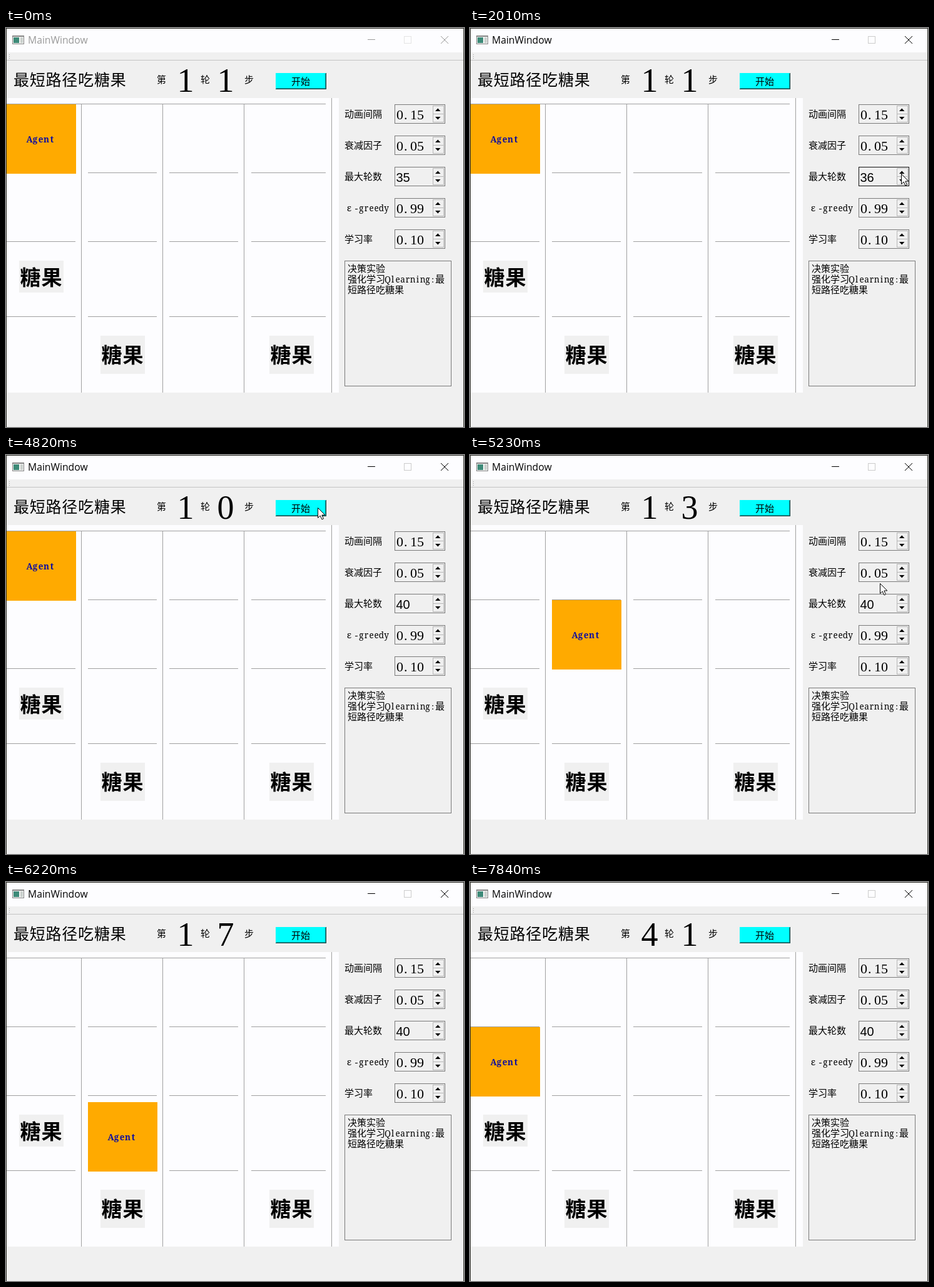
An HTML page with a canvas that plays this animation: 732 by 638 pixels, repeating every 8 s.

```html
<!DOCTYPE html>
<html lang="zh-CN">
<head>
<meta charset="utf-8">
<style>
html, body { margin: 0; width: 732px; height: 638px; overflow: hidden; }
canvas { display: block; }
</style>
</head>
<body>
<canvas id="stage" width="732" height="638"></canvas>
<script>
const ctx = document.getElementById('stage').getContext('2d');
const LOOP = 8000;
const PANEL = '#f0f0f0', WHITE = '#fdfdff', EDGE = '#7a7a7a', GRID = '#a0a0a0';
const CJK = '"Noto Sans CJK SC", "Noto Sans CJK", sans-serif';
const DIGITS = '"Liberation Serif", serif', LETTERS = '"Noto Serif", serif';

// time, round, step, column, row
const agentKeys = [
  [0, 1, 1, 0, 0], [4820, 1, 0, 0, 0], [5020, 1, 1, 1, 0], [5230, 1, 3, 1, 1],
  [5430, 1, 4, 2, 1], [5630, 1, 5, 2, 1], [5830, 1, 6, 2, 2], [6030, 1, 7, 1, 2],
  [6230, 1, 8, 1, 1], [6430, 1, 9, 0, 1], [6630, 2, 0, 0, 0], [6830, 2, 1, 0, 0],
  [7260, 2, 2, 0, 1], [7450, 3, 0, 0, 0], [7650, 3, 1, 0, 1], [7840, 4, 1, 0, 1]
];
// time, pointer shape, x, y
const pointerKeys = [
  [0, ''], [610, 'arrow', 700, 330], [810, 'arrow', 686, 272], [1010, 'beam', 675, 249],
  [1210, 'arrow', 689, 232], [1410, 'arrow', 689, 233], [3230, 'beam', 663, 246],
  [3430, 'arrow', 612, 192], [3630, 'arrow', 552, 132], [3830, 'arrow', 512, 96],
  [4020, 'arrow', 497, 87], [4220, 'arrow', 498, 84], [5020, 'arrow', 560, 130],
  [5230, 'arrow', 655, 205], [5430, 'arrow', 696, 240], [5630, '']
];
const at = (keys, t) => keys.findLast(k => k[0] <= t);

function rect(x, y, w, h, color) {
  ctx.fillStyle = color;
  ctx.fillRect(x, y, w, h);
}
function frame(x, y, w, h, color) {
  ctx.strokeStyle = color;
  ctx.lineWidth = 1;
  ctx.strokeRect(x + .5, y + .5, w - 1, h - 1);
}
function shape(points, fill, stroke) {
  ctx.beginPath();
  points.forEach(([x, y]) => ctx.lineTo(x, y));
  ctx.closePath();
  ctx.fillStyle = fill;
  ctx.fill();
  if (stroke) {
    ctx.strokeStyle = stroke;
    ctx.lineWidth = 1;
    ctx.stroke();
  }
}
function write(text, x, y, font, color = '#000') {
  ctx.font = font;
  ctx.fillStyle = color;
  ctx.fillText(text, x, y);
}

// Full-width and half-width characters on a fixed pitch, centred on line cy.
function cells(text, x, cy, size, { weight = 400, color = '#000', half = size / 2, full = size } = {}) {
  ctx.textAlign = 'center';
  for (const ch of String(text)) {
    const cjk = ch > '\u2000', letter = /[a-zε]/i.test(ch);
    const pitch = cjk || ch === 'ε' ? full : half;
    const family = cjk ? CJK : letter ? LETTERS : DIGITS;
    const px = letter && ch !== 'ε' ? size * .9 : size;
    const cx = x + (ch === '.' ? pitch * .35 : pitch / 2);
    write(ch, cx, cy + size * (cjk ? .38 : .35), `${weight} ${px}px ${family}`, color);
    x += pitch;
  }
  ctx.textAlign = 'left';
}

function titleBar(active) {
  const ink = active ? '#000' : '#999';
  rect(1, 1, 730, 38, WHITE);
  rect(10, 12, 19, 14, '#858585');
  rect(11, 14, 17, 11, '#f4f4f4');
  rect(12, 15, 9, 9, '#3d8a78');
  rect(23, 15, 4, 9, '#c9d0cc');
  write('MainWindow', 35, 25, '15.7px "Open Sans", sans-serif', ink);
  rect(578, 18, 12, 1, ink);
  frame(636, 13, 12, 12, active ? '#ccc' : '#e4e4e4');
  ctx.strokeStyle = ink;
  ctx.beginPath();
  ctx.moveTo(695, 13); ctx.lineTo(707, 25);
  ctx.moveTo(707, 13); ctx.lineTo(695, 25);
  ctx.stroke();
  for (const y of [42, 45, 48]) rect(5, y, 1, 1, GRID);
  rect(1, 51, 730, 1, '#c4c4c4');
}

function header(round, step) {
  cells('最短路径吃糖果', 11.5, 82.5, 25, { full: 25.8 });
  cells('第', 241, 82, 15);
  cells('轮', 311, 82, 15);
  cells('步', 381, 82, 15);
  cells(round, 273.5, 83.5, 54);
  cells(step, 337.5, 83.5, 54);
  rect(431, 72, 81, 26, '#00ffff');
  rect(431, 97, 81, 1, '#003c3c');
  rect(511, 72, 1, 26, '#003c3c');
  rect(432, 96, 79, 1, '#00a0a0');
  rect(510, 73, 1, 24, '#00a0a0');
  cells('开始', 456, 85, 15);
}

function candy(x, y, h, cy) {
  rect(x, y, 71, h, PANEL);
  cells('糖果', x + 1, cy, 33, { weight: 700, full: 34 });
}

function board(col, row) {
  rect(1, 112, 531, 471, WHITE);
  rect(1, 121, 510, 1, GRID);
  for (const y of [231, 341, 461])
    for (const x of [1, 131, 261, 392]) rect(x, y, x === 392 ? 119 : 110, 1, GRID);
  for (const x of [120, 250, 380]) rect(x, 121, 1, 462, GRID);
  rect(520, 112, 1, 471, GRID);
  candy(21, 372, 51, 398);
  candy(151, 492, 61, 522.5);
  candy(421, 492, 61, 522.5);
  const x = 1 + col * 130, y = [122, 232, 352][row];
  rect(x, y, 111, 111, '#ffaa00');
  cells('Agent', x + 32, y + 56, 15, { weight: 700, color: '#0c0ca0', half: 9 });
}

function spinBox(y, edge) {
  frame(621, y, 81, 31, edge);
  frame(682, y + 2, 18, 14, '#b8b8b8');
  frame(682, y + 15, 18, 14, '#b8b8b8');
  shape([[686, y + 11], [694.5, y + 11], [690.2, y + 6.5]], '#000');
  shape([[686, y + 20], [694.5, y + 20], [690.2, y + 24.5]], '#000');
}

function settings(rounds, focused) {
  const rows = [['动画间隔', '0.15'], ['衰减因子', '0.05'], ['最大轮数', rounds],
                ['ε-greedy', '0.99'], ['学习率', '0.10']];
  rows.forEach(([label, value], i) => {
    const y = 122 + 50 * i;
    cells(label, 541, y + 15.5, 15, { half: 8 });
    spinBox(y, i === 2 && focused ? '#111' : EDGE);
    if (i === 2) write(value, 623.5, y + 24, '20px "Liberation Sans", sans-serif');
    else cells(value, 624, y + 16.5, 22);
  });
  frame(541, 372, 171, 201, EDGE);
  ['决策实验', '强化学习Qlearning:最', '短路径吃糖果'].forEach((line, i) =>
    cells(line, 546, 384.5 + 17 * i, 15, { half: 8 }));
}

function pointer([, kind, x, y]) {
  if (kind === 'beam') {
    rect(x, y - 7, 1, 15, '#000');
    for (const dy of [-8, 7]) {
      rect(x - 3, y + dy, 3, 1, '#000');
      rect(x + 1, y + dy, 3, 1, '#000');
    }
  } else if (kind === 'arrow') {
    const outline = [[0, 0], [0, 16], [3.7, 12.6], [6.5, 18.5], [9, 17.3], [6.3, 11.6], [11.3, 11.4]];
    shape(outline.map(([dx, dy]) => [x + dx + .5, y + dy + .5]), '#fff', '#000');
  }
}

function draw(t) {
  const [, round, step, col, row] = at(agentKeys, t);
  const clicks = Math.floor((t - 1830) / 195) + 1;
  rect(0, 0, 732, 638, PANEL);
  titleBar(t >= 1410);
  header(round, step);
  board(col, row);
  settings(35 + Math.max(0, Math.min(5, clicks)), t >= 1410 && t < 4420);
  rect(0, 0, 732, 1, '#2a2a24');
  rect(0, 0, 1, 638, '#2a2a24');
  rect(731, 0, 1, 638, '#3a3a34');
  pointer(at(pointerKeys, t));
}

function tick() {
  draw(performance.now() % LOOP);
  requestAnimationFrame(tick);
}
tick();
</script>
</body>
</html>
```
